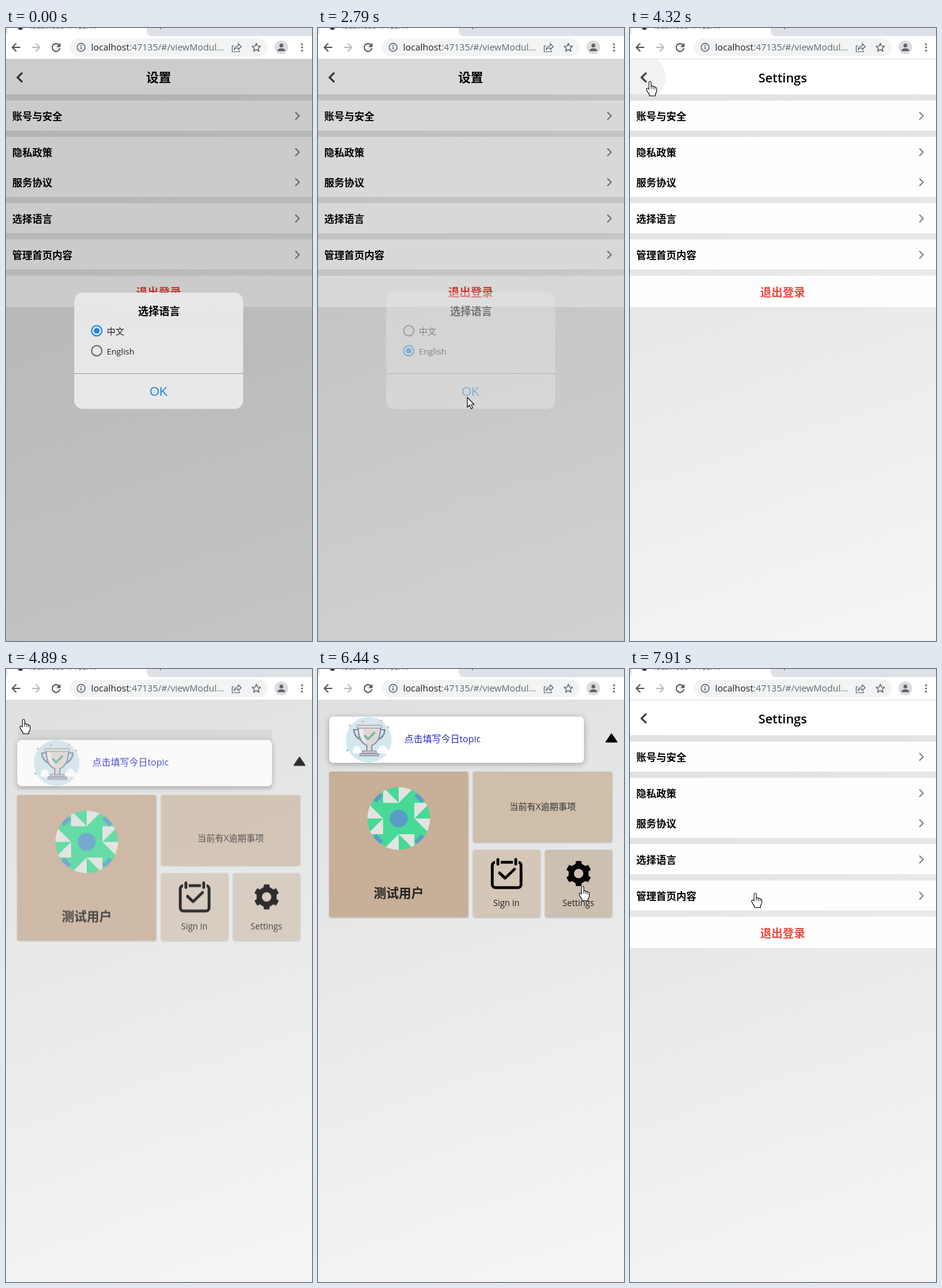
Animation, 489 px wide and 980 px high, one loop 8000 ms. Source, as an HTML page:

```html
<!DOCTYPE html>
<html lang="zh-CN">
<head>
<meta charset="utf-8">
<title>Settings</title>
<style>
html,body{margin:0;width:100%;height:100%;overflow:hidden;background:#eee}
svg{display:block;width:489px;height:980px;font-family:"Open Sans","Noto Sans CJK SC",sans-serif}
.line{fill:none;stroke-linecap:round;stroke-linejoin:round}
</style>
</head>
<body>
<script>
const LOOP = 8000;

const text = (x, y, size, str, attrs = '') =>
  `<text x="${x}" y="${y}" font-size="${size}" ${attrs}>${str}</text>`;
const rect = (x, y, w, h, fill, attrs = '') =>
  `<rect x="${x}" y="${y}" width="${w}" height="${h}" fill="${fill}" ${attrs}/>`;
const circle = (x, y, r, fill, attrs = '') =>
  `<circle cx="${x}" cy="${y}" r="${r}" fill="${fill}" ${attrs}/>`;
const line = (d, color, width, attrs = '') =>
  `<path class="line" d="${d}" stroke="${color}" stroke-width="${width}" ${attrs}/>`;
const shape = (d, fill, attrs = '') => `<path d="${d}" fill="${fill}" ${attrs}/>`;
const spin = (n, part) => Array.from({length: n}, (_, i) =>
  `<g transform="rotate(${i * 360 / n})">${part}</g>`).join('');

const bold = 'font-weight="700"', mid = 'text-anchor="middle"';

function browserBar() {
  const grey = '#5f6368';
  return rect(0, 0, 489, 50, '#fff') +
    shape('M225 0H489V13H233Q225 13 225 5Z', '#dee1e6') + rect(0, 0, 2, 10, '#dee1e6') +
    circle(23, -1, 4, '#2b3350') +
    text(38, 1, 12.5, 'localhost:47135/#/', 'fill="#45494d"') +
    text(245, -1, 12.5, 'p', 'fill="#45494d"') +
    rect(0, 49, 489, 1, '#dcdee0') +
    line('M22 31H10M16 25L10 31L16 37', '#505357', 1.8) +
    line('M42 31H54M48 25L54 31L48 37', '#babcbe', 1.8) +
    line('M85 27.5A6.2 6.2 0 1 0 86 33', '#505357', 1.9) + shape('M87 24V30.5H80.5Z', '#505357') +
    rect(102, 17, 316, 28, '#f1f3f4', 'rx="14"') +
    circle(120, 31, 6.4, 'none', `stroke="${grey}" stroke-width="1.5"`) +
    line('M120 30.5V34', grey, 1.6) + circle(120, 28, 1, grey) +
    text(136, 36, 14.6, 'localhost<tspan fill="#666a6e">:47135/#/viewModul...</tspan>', 'fill="#202124"') +
    line('M364 28.500H361.500V38H373V35.500M364.500 34.500Q365.500 29 371 28.500V25L376 30L371 34.500V31.500Q367 31.500 364.500 34.500Z', grey, 1.2) +
    line('M400 24.500L401.900 28.900L406.700 29.300L403.100 32.500L404.200 37.200L400 34.700L395.800 37.200L396.900 32.500L393.300 29.300L398.100 28.900Z', grey, 1.4) +
    circle(440, 31, 11, '#dadce0') + circle(440, 28, 3, grey) +
    shape('M434 37V35.500Q435 32.500 440 32.500Q445 32.500 446 35.500V37Z', grey) +
    [26, 31, 36].map(y => circle(473, y, 1.6, grey)).join('');
}

function settingsPage() {
  const rows = [['账号与安全', 141], ['隐私政策', 199], ['服务协议', 247], ['选择语言', 305], ['管理首页内容', 363]];
  return rect(0, 50, 489, 56, '#fff') +
    [[116, 48], [174, 96], [280, 48], [338, 48], [396, 50]].map(([y, h]) => rect(0, y, 489, h, '#fefefe')).join('') +
    circle(22, 78, 35, '#f2f2f2', 'id="backHover" clip-path="url(#headClip)"') +
    line('M26 71.500L18.500 79L26 86.500', '#3a3a3e', 3, 'style="stroke-linecap:butt;stroke-linejoin:miter"') +
    text(244, 87, 20, '设置', `id="title" font-weight="700" ${mid}`) +
    rows.map(([label, y]) => text(10, y + 6, 16, label, bold) +
      line(`M463 ${y - 6}L468.500 ${y - .5}L463 ${y + 5}`, '#858585', 2)).join('') +
    text(244, 428.500, 18, '退出登录', `${bold} ${mid} fill="#f04840"`);
}

function radio(y, name) {
  return circle(145, y, 8.2, 'none', `id="${name}Ring" stroke-width="2"`) +
    circle(145, y, 4.6, '#1e88e5', `id="${name}Dot"`);
}

function dialog() {
  return rect(109, 423, 270, 186, 'url(#glass)', 'rx="14"') +
    text(244.500, 459, 16.8, '选择语言', `${bold} ${mid}`) +
    circle(144.500, 516, 19.5, '#000', 'id="radioHover"') +
    radio(484, 'zh') + radio(516, 'en') +
    text(161, 490, 14, '中文', 'fill="#222"') +
    text(161, 522, 13.3, 'English', 'fill="#222"') +
    rect(109, 552, 270, 1, '#999') +
    text(244, 588, 20, 'OK', `id="ok" ${mid} fill="#1e88e5" style="font-family:'Liberation Sans',sans-serif"`);
}

function trophy() {
  const edge = '#7d8ba0';
  return circle(81, 113, 36.5, '#d4e7ef') +
    circle(62, 129, 6, '#fff') + rect(55, 129, 14, 6, '#fff', 'rx="3"') +
    circle(103, 128, 6, '#fff') + rect(94, 128, 19, 7, '#fff', 'rx="3"') +
    line('M66 97H57Q59 111 70 113M98 97H107Q105 111 94 113', edge, 2.2) +
    shape('M64 92H100Q100 117 86 122V132H78V122Q64 117 64 92Z', '#e0d8d7', `stroke="${edge}" stroke-width="1.8"`) +
    shape('M66 96H72Q72 112 80 119Q67 115 66 96Z', '#f0ebe9') +
    rect(62, 90, 40, 4.5, '#eadfd9', `rx="2" stroke="${edge}"`) +
    rect(71, 131, 22, 4, '#d3c6c7', `stroke="${edge}"`) +
    rect(67, 135, 30, 4, '#c2bac5', `stroke="${edge}"`) +
    line('M75 107L80 112L90 102', '#75b5a3', 3.2) +
    [[51, 90], [72, 84], [101, 83], [112, 93]].map(([x, y]) => circle(x, y, 1.8, '#e5b89e')).join('') +
    circle(47, 130, 1.5, '#5fc3b5');
}

function avatar() {
  return `<g clip-path="url(#faceClip)" transform="translate(129 239)">` +
    circle(0, 0, 50, '#47d996') +
    spin(4, shape('M0 -25L25 -50H0ZM0 -25H-25V-50Z', '#e2e4e2') +
      shape('M-41 -30L-30 -41L-25 -36L-36 -25Z', '#5a9cc8')) +
    circle(0, 0, 14.3, '#5a9cc8') + '</g>';
}

function homePage() {
  const card = (x, y, w, h, fill, id = '') => rect(x, y, w, h, fill, `rx="3" filter="url(#low)" ${id}`);
  return rect(18, 60, 407, 95, '#000', 'id="halo" opacity=".06"') +
    rect(18, 76, 407, 74, '#fff', 'rx="7" filter="url(#high)"') + trophy() +
    text(138, 117, 14.7, '点击填写今日topic', 'fill="#2429c4"') +
    shape('M469 104L477.500 116.500H460.500Z', '#000', 'stroke="#000" stroke-width="2" stroke-linejoin="round"') +
    card(18, 164, 222, 232.500, '#c8af97') + avatar() +
    text(129, 366, 20, '测试用户', `${bold} ${mid} fill="#222"`) +
    card(248, 164, 222, 112.500, '#cfbeaa') +
    text(359, 225, 14, '当前有X逾期事项', `id="notice" ${mid} fill="#333"`) +
    card(248, 289, 107, 107.500, '#d4c7b8') +
    rect(278.500, 309, 46, 40.500, 'none', 'rx="5" stroke="#000" stroke-width="4.5"') +
    [287.500, 316].map(x => line(`M${x} 304.500V312`, '#d4c7b8', 9) + line(`M${x} 304.500V312`, '#000', 4.5)).join('') +
    line('M290 326L299 334.500L314 320', '#000', 4.5) +
    text(301, 379, 13.6, 'Sign in', `${mid} fill="#222"`) +
    card(363, 289, 107, 107.500, '#d4c7b8', 'id="gearCard"') +
    `<g transform="translate(416.5 327)">` +
    circle(0, 0, 11.8, 'none', 'stroke="#000" stroke-width="8.5"') +
    spin(6, shape('M-5.500 -13L-4.200 -20H4.200L5.500 -13Z', '#000')) + '</g>' +
    text(416, 379, 13.6, 'Settings', `${mid} fill="#222"`);
}

const pointer = 'stroke="#111" stroke-width="1.1" stroke-linejoin="round"';
document.body.innerHTML = `<svg viewBox="0 0 489 980">
<defs>
  <linearGradient id="page" gradientUnits="userSpaceOnUse" x1="80" y1="50" x2="390" y2="980">
    <stop stop-color="#dfe0e0"/><stop offset="1" stop-color="#f5f5f5"/></linearGradient>
  <linearGradient id="glass" x2="0" y2="1">
    <stop stop-color="#e9e6e6"/><stop offset=".3" stop-color="#e7e7e7"/><stop offset="1" stop-color="#e8e8e8"/></linearGradient>
  <filter id="low" x="-5%" y="-5%" width="110%" height="112%"><feDropShadow dx="0" dy="1" stdDeviation="1" flood-opacity=".3"/></filter>
  <filter id="high" x="-10%" y="-30%" width="120%" height="170%"><feDropShadow dx="0" dy="2" stdDeviation="5" flood-opacity=".3"/></filter>
  <clipPath id="headClip"><rect y="50" width="489" height="56"/></clipPath>
  <clipPath id="faceClip"><circle r="50"/></clipPath>
</defs>
${rect(0, 50, 489, 930, 'url(#page)')}
<g id="settings">${settingsPage()}</g>
<g id="home">${homePage()}</g>
${rect(0, 50, 489, 930, '#000', 'id="shade"')}
<g id="dialog">${dialog()}</g>
${browserBar()}
<g id="cursor">
  <g id="arrow">${shape('M.5 .5V16.500L4.200 13L6.700 18.700L9.300 17.600L6.900 12H11.600Z', '#fff', pointer)}</g>
  <g id="hand">${shape('M-1.800 13V2Q-1.800 .5 0 .5Q1.800 .5 1.800 2V8Q4.500 6.500 5 9Q7.600 7.600 8 10Q10.600 9.200 10.600 12V16Q10.500 18.500 8.500 20.500V23.500H-1V21Q-4 18 -5.600 13.500Q-6 11 -4 11.300Q-2.800 11.600 -1.800 13Z', '#fff', pointer)}
  ${line('M1.800 8V12M5 9V12.500M8 10V13', '#111', .9)}</g>
</g>
</svg>`;

const $ = id => document.getElementById(id);
const set = (id, attrs) => { for (const k in attrs) $(id).setAttribute(k, attrs[k]); };
const ramp = (t, a, b) => Math.min(1, Math.max(0, (t - a) / (b - a)));
const easeOut = p => 1 - (1 - p) ** 3;
const easeBoth = p => p * p * (3 - 2 * p);

// time, x, y, hand shape
const path = [
  [70, 459, 980, 0], [860, 251, 580, 0], [1030, 251, 580, 0], [1330, 154, 514, 1],
  [1470, 154, 514, 1], [1550, 150, 513, 1], [2000, 150, 513, 1], [2410, 238, 590, 1],
  [2560, 238, 590, 0], [3340, 238, 590, 0], [3560, 140, 297, 1], [3710, 140, 297, 1],
  [4320, 32, 85, 1], [4490, 28, 80, 1], [5510, 28, 80, 1], [6290, 422, 348, 1],
  [6440, 423, 347, 1], [6990, 423, 347, 1], [7760, 222, 353, 1], [7910, 200, 358, 1], [LOOP, 200, 358, 1]
];

function moveCursor(t) {
  const i = Math.max(0, path.findLastIndex(k => k[0] <= t));
  const a = path[i], b = path[i + 1] || a;
  const p = easeBoth(ramp(t, a[0], b[0] + .01));
  set('cursor', {
    transform: `translate(${a[1] + (b[1] - a[1]) * p} ${a[2] + (b[2] - a[2]) * p})`,
    opacity: t < 70 ? 0 : 1
  });
  set('arrow', {opacity: 1 - a[3]});
  set('hand', {opacity: a[3]});
}

function draw(t) {
  const close = ramp(t, 2740, 2940);
  set('shade', {opacity: .2 * (1 - close)});
  set('dialog', {opacity: (1 - close) ** 3});

  const picked = ramp(t, 1720, 1870);
  set('zhDot', {r: 4.6 * (1 - picked)});
  set('enDot', {r: 4.6 * picked});
  set('zhRing', {stroke: picked > .5 ? '#6b6b6b' : '#1e88e5'});
  set('enRing', {stroke: picked > .5 ? '#1e88e5' : '#6b6b6b'});
  set('radioHover', {opacity: .06 * ramp(t, 1270, 1400) * (1 - ramp(t, 2060, 2200))});
  set('ok', {opacity: t > 2560 && t < 2640 ? .7 : 1});

  const english = t >= 3900;
  $('title').textContent = english ? 'Settings' : '设置';
  set('title', {'font-weight': english ? 600 : 700});
  set('backHover', {opacity: ramp(t, 4180, 4300) * (t < 6000 ? 1 : 0)});

  const back = t > 6500;
  const rise = easeOut(ramp(t, 7050, 7350));
  set('settings', {
    opacity: back ? rise : 1 - ramp(t, 4620, 4800),
    transform: `translate(0 ${back ? 80 * (1 - rise) : 0})`
  });
  const enter = easeOut(ramp(t, 4700, 5150));
  set('home', {
    opacity: enter * (1 - ramp(t, 6980, 7140)),
    transform: `translate(0 ${196 * (1 - enter)})`
  });
  set('halo', {opacity: .06 * (1 - ramp(t, 5300, 5420))});
  set('notice', {transform: `translate(0 ${13 * (1 - easeOut(ramp(t, 5480, 5620)))})`});
  set('gearCard', {fill: t > 6180 ? '#ccc0b2' : '#d4c7b8'});
  moveCursor(t);
}

const start = performance.now();
(function tick() {
  draw((performance.now() - start) % LOOP);
  requestAnimationFrame(tick);
})();
</script>
</body>
</html>
```
